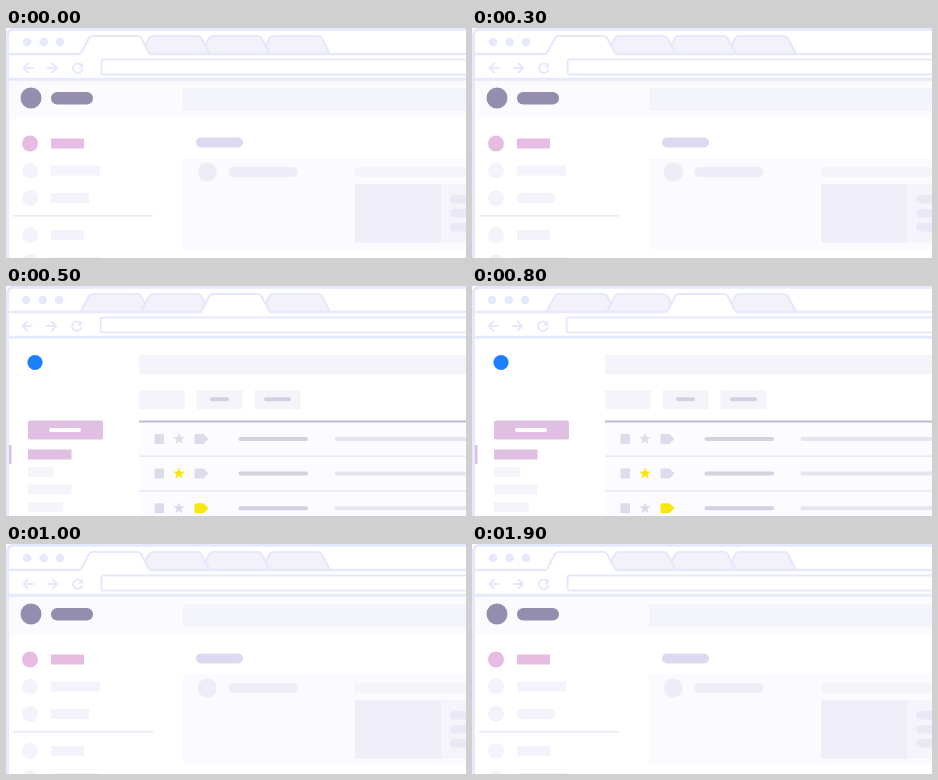
An HTML page for the animation above (2.5 s loop, 460 px wide and 230 px high).

```html
<!DOCTYPE html>
<html lang="en">
<head>
<meta charset="utf-8">
<title>Switching tabs</title>
<style>
html, body { margin: 0; width: 100%; height: 100%; overflow: hidden; background: #fff; }
svg { display: block; width: 460px; height: 230px; }
</style>
</head>
<body>
<svg id="stage" viewBox="0 0 460 230" xmlns="http://www.w3.org/2000/svg"></svg>
<script>
const LOOP = 2500;
const LINE = '#e6e8fb';
const stage = document.getElementById('stage');

const rect = (x, y, w, h, fill, r = 0) =>
  `<rect x="${x}" y="${y}" width="${w}" height="${h}" rx="${r}" fill="${fill}"/>`;
const pill = (x, y, w, h, fill) => rect(x, y, w, h, fill, h / 2);
const dot = (x, y, r, fill) => `<circle cx="${x}" cy="${y}" r="${r}" fill="${fill}"/>`;
const stroke = (d, width, color = LINE, fill = 'none') =>
  `<path d="${d}" fill="${fill}" stroke="${color}" stroke-width="${width}" stroke-linejoin="round"/>`;

function tab(i, active) {
  const x = 74.5 + i * 60.2;
  const d = `M${x} 26 L${x + 8.5} 10 Q${x + 9.6} 8 ${x + 12} 8 H${x + 57} Q${x + 59.5} 8 ${x + 60.6} 10 L${x + 69} 26`;
  return stroke(d, 2.2, LINE, active ? '#fff' : '#f3f2fa') +
    (active ? rect(x + 1, 24.8, 67, 3, '#fff') : '');
}

// Tabs nearer the active one overlap those further away.
function browser(active, dx) {
  const order = [0, 1, 2, 3].sort((a, b) => Math.abs(b - active) - Math.abs(a - active));
  const left = 74.5 + active * 60.2;
  const icons =
    [21, 37.7, 54].map(x => dot(x, 14, 4.3, LINE)).join('') +
    stroke('M27.5 40 H17.5 M22.5 35 L17.5 40 L22.5 45', 2) +
    stroke('M41 40 H51 M46 35 L51 40 L46 45', 2) +
    stroke('M75.2 37.2 A4.7 4.7 0 1 0 76.3 41', 2) +
    `<path d="M77 34.5 V39.5 H72Z" fill="${LINE}"/>` +
    `<rect x="95.5" y="31.5" width="380" height="15" rx="2" fill="#fff" stroke="${LINE}" stroke-width="2"/>`;
  return order.map(i => tab(i, i === active)).join('') +
    stroke(`M2 26 H${left} M${left + 69} 26 H460`, 2.6) +
    stroke('M2 51.3 H460', 3) +
    stroke('M1.5 230 V8 Q1.5 1.3 8 1.3 H460', 3) +
    `<g transform="translate(${dx} 0)">${icons}</g>`;
}

function dashboard() {
  const pale = '#f4f3fb';
  return rect(3, 52, 457, 39, '#fbfaff') +
    dot(25, 70, 10.5, '#938eae') + pill(45, 64, 42, 12.5, '#938eae') +
    rect(177, 60, 283, 23, '#f4f4fc') +
    dot(24, 115.5, 8, '#e6bce3') + rect(45, 110.5, 33, 10, '#e6bce3') +
    [[142.5, 49], [170, 38], [207, 33], [234, 49]].map(([y, w]) =>
      dot(24, y, 8, pale) + rect(45, y - 5, w, 10, pale)).join('') +
    rect(7, 187, 140, 1.6, '#e9eaf3') +
    pill(190, 109.5, 47, 10, '#dcd9f0') +
    rect(177, 130, 290, 91, '#fbfaff', 2) +
    dot(201.3, 144, 9.5, '#eeecf7') + pill(222.5, 139, 69, 10, '#eeecf7') +
    rect(349, 139, 111, 10, '#f5f4fb') +
    rect(349, 156, 111, 58.5, '#f5f4fb') + rect(349, 156, 86, 58.5, '#efeef8') +
    [167, 181, 195].map(y => pill(444, y, 30, 8.5, '#e9e8f4')).join('');
}

function star(x, y, fill) {
  const pts = Array.from({ length: 10 }, (_, i) => {
    const r = i % 2 ? 2.6 : 6, a = Math.PI * (i / 5 - 0.5);
    return `${(x + r * Math.cos(a)).toFixed(2)},${(y + r * Math.sin(a)).toFixed(2)}`;
  });
  return `<polygon points="${pts.join(' ')}" fill="${fill}"/>`;
}

function mailRow(y, starred, tagged) {
  const grey = '#dddcea', yellow = '#f7e60f';
  return rect(148.5, y - 5, 9.5, 10, grey, 1) +
    star(173, y, starred ? yellow : grey) +
    `<path d="M190 ${y - 5} H197.5 L202.5 ${y} L197.5 ${y + 5} H190 Q188.5 ${y + 5} 188.5 ${y + 3.5} V${y - 3.5} Q188.5 ${y - 5} 190 ${y - 5}Z" fill="${tagged ? yellow : grey}"/>` +
    pill(232.5, y - 2, 69.5, 4, '#d2d0e1') +
    pill(328.5, y - 2, 150, 4, '#e6e5ef');
}

function inbox() {
  const pale = '#f5f4fa', pink = '#dfbfe2';
  return dot(29, 76.5, 7.6, '#1a80fb') +
    rect(133, 69, 327, 19, pale) +
    [133, 190.5, 248.5].map(x => rect(x, 104, 46, 19, pale, 1)).join('') +
    pill(204, 111.2, 19, 4, '#d2d0e1') + pill(258, 111.2, 27, 4, '#d2d0e1') +
    rect(22, 134.5, 75, 19, pink, 2) + pill(43, 142, 32, 4, '#fff') +
    rect(3, 159, 2.5, 19, pink) + rect(22, 163.5, 43.5, 10, pink) +
    [[181, 26], [198.5, 43.5], [216, 35]].map(([y, w]) => rect(22, y, w, 10, pale)).join('') +
    rect(133, 135, 327, 95, '#fcfbff') +
    rect(133, 134.5, 327, 2, '#bdb9d2') +
    rect(133, 169.5, 327, 1.3, '#e6e5f2') + rect(133, 204.3, 327, 1.3, '#e6e5f2') +
    mailRow(153, false, false) + mailRow(187.5, true, false) + mailRow(222.3, false, true);
}

const scenes = [dashboard() + browser(0, 0), inbox() + browser(2, -0.9)];
let shown = -1;

function draw(ms) {
  const t = ms % LOOP;
  const scene = t >= 500 && t < 1000 ? 1 : 0;
  if (scene !== shown) stage.innerHTML = scenes[shown = scene];
}

const start = performance.now();
function tick() {
  draw(performance.now() - start);
  requestAnimationFrame(tick);
}
tick();
</script>
</body>
</html>
```
